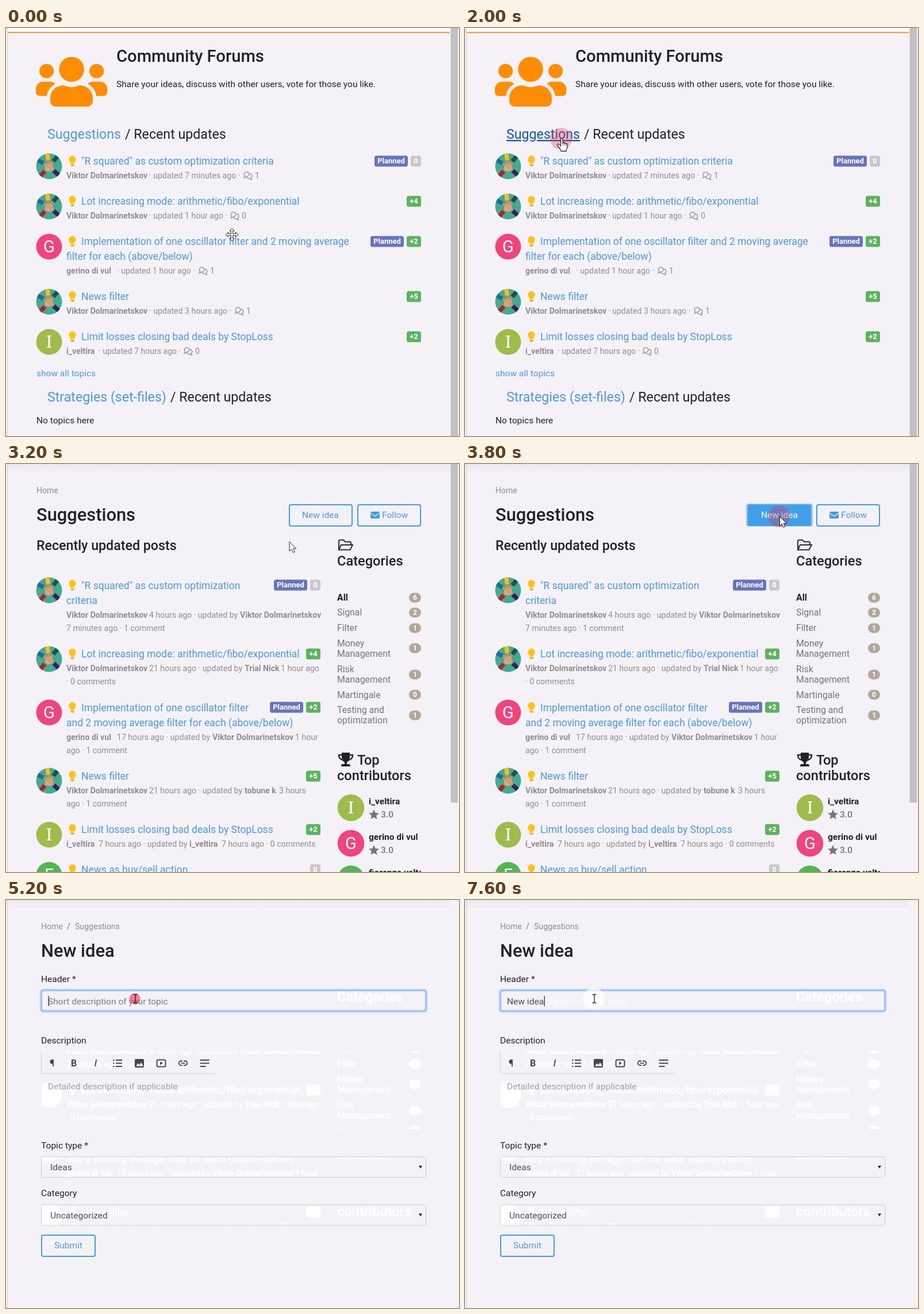
These frames come from a looping animation (788 px wide and 711 px high, 8000 ms). An HTML page:

```html
<!DOCTYPE html>
<html lang="en">
<head>
<meta charset="utf-8">
<title>Community forums</title>
<style>
  html, body { margin: 0; width: 100%; height: 100%; overflow: hidden; background: #f4f2f6; }
  svg { display: block; width: 788px; height: 711px; font-family: Roboto, sans-serif; fill: #212225; }
  text { white-space: pre; }
  .link { fill: #5096dc; }
  .hover .link, .link.hover { fill: #1455a8; text-decoration: underline; }
  .muted { fill: #8f8d93; }
  .side { fill: #77757b; }
  .field { fill: none; stroke: #cfcdd3; }
  .outline { fill: none; stroke: #429ce2; stroke-width: 2; }
  .ghost { filter: brightness(0) invert(1); }
  .ghost text { stroke: #fff; stroke-width: .4; }
</style>
</head>
<body>
<svg id="stage" viewBox="0 0 788 711"></svg>
<script>
const BODY = 15.55, TITLE = 17.48, META = 14.1, HEAD = 23.2, SIDE_HEAD = 23.6, MAIN = 30.85;
const VIKTOR = 'Viktor Dolmarinetskov', GERINO = 'gerino di vul', VELTIRA = 'i_veltira';

const text = (x, y, size, str, attrs = '') => `<text x="${x}" y="${y}" font-size="${size}" ${attrs}>${str}</text>`;
const rect = (x, y, w, h, attrs = '') => `<rect x="${x}" y="${y}" width="${w}" height="${h}" ${attrs}/>`;
const circle = (x, y, r, attrs = '') => `<circle cx="${x}" cy="${y}" r="${r}" ${attrs}/>`;
const path = (d, attrs = '') => `<path d="${d}" ${attrs}/>`;
const at = (x, y, content, attrs = '') => `<g transform="translate(${x} ${y})" ${attrs}>${content}</g>`;
const line = (d, color, width = 1) => path(d, `fill="none" stroke="${color}" stroke-width="${width}"`);
const bold = 'font-weight="700"', medium = 'font-weight="500"', mid = 'text-anchor="middle"';

const bulb = y => at(115.5, y,
  path('M-3.3 4.2C-3.3 1.5-6.2.5-6.2-3.2a6.2 6.2 0 0 1 12.4 0C6.2.5 3.3 1.5 3.3 4.2z', 'fill="#fcc21b"') +
  path('M-3.2 5.2h6.4v2L1.6 9h-3.2l-1.6-1.8z', 'fill="#eab31c"'));

const title = (y, ...lines) => bulb(y - 6) +
  lines.map((s, i) => text(i ? 105 : 131, y + i * 26, TITLE, s, 'class="link"')).join('');

const badge = (left, right, y, str, color) => rect(left, y - 9.5, right - left, 19, `rx="3.5" fill="${color}"`) +
  text((left + right) / 2, y + 4.3, 13, str, `${bold} ${mid} fill="#fff"`);
const votes = (right, y, n) => n
  ? badge(right - 25, right, y, '+' + n, '#5cb35f')
  : badge(right - 18, right, y, '0', '#cac8cc');
const planned = (left, y) => badge(left, left + 58, y, 'Planned', '#6974bc');

const arm = (angle, sleeve) => `<g transform="rotate(${angle})">` +
  line('M0-13V0', '#c1906a', 5) + line('M0-24V-11', sleeve, 7.5) + '</g>';
const hands = y => at(75, y, circle(0, 0, 22.5, 'fill="#45aa91"') + '<g clip-path="url(#disc)">' +
  arm(-8, '#f4bd22') + arm(40, '#17554a') + arm(133, '#30225f') + arm(222, '#a72631') + arm(-62, '#216e94') +
  circle(0, 2, 7, 'fill="#d9ac82"') + line('M-5-2L4 6M-2-5L6 3', '#a96f4f') + '</g>');
const letter = (x, y, ch, color, serif, r = 22.5) => circle(x, y, r, `fill="${color}"`) +
  text(x, y + 10, 29, ch, `${mid} fill="#fff" ${serif ? 'font-family="Noto Serif, serif"' : ''}`);
const avatarG = (x, y, r) => letter(x, y, 'G', '#ee457d', false, r);
const avatarI = (x, y, r) => letter(x, y, 'I', '#9fbb4c', true, r);

const bubbles = (x, y) => at(x, y,
  path('M1 2L2.6-1A4.4 4 0 1 1 5.5 0Q3.5 2 1 2zM10.5-5a4.2 3.8 0 0 1 2.4 7l1.6 3q-3 0-4.5-1.8a4.5 4 0 0 1-4.4-2',
    'fill="none" stroke="#99979c" stroke-width="1.4"'));

// A line of grey details made of [x, string, isBold] pieces.
const meta = (y, ...pieces) => pieces.map(([x, str, strong]) =>
  text(x, y, META, str, `class="muted" ${strong ? bold : ''}`)).join('');
const summary = (y, name, x, age, iconX, count) =>
  meta(y, [105, name, 1], [x, `· updated ${age} ago ·`], [iconX + 20, count]) + bubbles(iconX, y - 3);

const chrome = thumb => rect(773.5, 0, 12.5, thumb, 'fill="#c1c0c3"') + rect(2, 0, 1, 711, 'fill="#d8cbd4"');
const softTop = rect(3, 0, 769, 12, 'fill="url(#shade)"') + rect(5, 11, 767, 1, 'fill="#e9e7eb"');

const sideBody = path('M52 106a12.4 12.4 0 0 1 12.4-12.4h12.4a12.4 12.4 0 0 1 8.8 3.6 29 29 0 0 0-14.6 21.2h-12.8a6.2 6.2 0 0 1-6.2-6.2z') +
  circle(70.6, 75, 12.6);
const people = `<g fill="#ff8c05">${sideBody}<g transform="translate(228.2) scale(-1 1)">${sideBody}</g>` +
  circle(114.1, 72, 21.8) +
  path('M77 128v-6a22 22 0 0 1 22-22h2a30 30 0 0 0 26 0h2a22 22 0 0 1 22 22v6a9 9 0 0 1-9 9h-56a9 9 0 0 1-9-9z') + '</g>';

const home = chrome(711) + rect(3, 0, 769, 7, 'fill="#fbfafc"') + rect(3, 6.8, 769, 2, 'fill="#e29a3f"') + people +
  text(192, 59, 29.2, 'Community Forums', medium) +
  text(192, 103, 15.5, 'Share your ideas, discuss with other users, vote for those you like.') +
  text(72, 193, HEAD, 'Suggestions', 'id="suggestions" class="link"') + text(207, 193, HEAD, '/ Recent updates') +
  hands(241) + title(238, '"R squared" as custom optimization criteria') + planned(641, 232) + votes(722, 232, 0) +
  summary(262, VIKTOR, 249, '7 minutes', 413, 1) +
  hands(311) + title(308, 'Lot increasing mode: arithmetic/fibo/exponential') + votes(722, 302, 4) +
  summary(332, VIKTOR, 249, '1 hour', 390, 0) +
  avatarG(75, 381) + title(378, 'Implementation of one oscillator filter and 2 moving average', 'filter for each (above/below)') +
  planned(634, 372) + votes(722, 372, 2) + summary(428, GERINO, 193, '1 hour', 335, 1) +
  hands(477) + title(474, 'News filter') + votes(722, 468, 5) + summary(498, VIKTOR, 249, '3 hours', 398, 1) +
  avatarI(75, 547) + title(544, 'Limit losses closing bad deals by StopLoss') + votes(722, 538, 2) +
  summary(568, VELTIRA, 161, '7 hours', 309, 0) +
  text(53, 607, 15.5, 'show all topics', 'class="link"') +
  text(72, 651, HEAD, 'Strategies (set-files)', 'id="strategies" class="link"') + text(286, 651, HEAD, '/ Recent updates') +
  text(53, 689, BODY, 'No topics here');

const category = (lines, baseline, count, y) =>
  lines.map((s, i) => text(576, baseline + i * 18.4, 15.8, s, s === 'All' ? bold : 'class="side"')).join('') +
  rect(701, y - 8.5, 21, 17, 'rx="8.5" fill="#b3a69b"') + text(711.5, y + 4.3, 12, count, `${bold} ${mid} fill="#fff"`);

const star = (x, y) => path('M0-9L2.6-3 9-2.5 4 1.8 5.6 8 0 4.8-5.6 8-4 1.8-9-2.5-2.6-3z', `transform="translate(${x} ${y})" fill="#77757b"`);
const contributor = (y, name) => `<g clip-path="url(#column)">${text(631, y - 6, 15.5, name, bold)}</g>` +
  star(640, y + 12) + text(652, y + 17, BODY, '3.0', `${medium} class="side"`);

const folder = line('M579 149v-14.5q0-2 2-2h6l3 3h8q2 0 2 2v2.5M579 149.5l4-8.5h20l-4.5 8.5z', '#2c2b2f', 2);
const trophy = at(591, 515,
  path('M-7-12H7v7Q7 3 2 4.5V8h4q2 0 2 4H-8q0-4 2-4h4V4.5Q-7 3-7-5z') +
  line('M-7-8h-5q0 8 8 9M7-8h5q0 8-8 9', '#2c2b2f', 2.5));

const topics = hands(220) +
  `<g id="firstTopic">${title(217.5, '"R squared" as custom optimization', 'criteria')}</g>` + planned(466, 211) + votes(547, 211, 0) +
  meta(268, [105, VIKTOR, 1], [249, '4 hours ago · updated by'], [407, VIKTOR, 1]) +
  meta(291, [105, '7 minutes ago · 1 comment']) +
  hands(340) + title(337, 'Lot increasing mode: arithmetic/fibo/exponential') + votes(547, 331, 4) +
  meta(361, [105, VIKTOR, 1], [249, '21 hours ago · updated by'], [415, 'Trial Nick', 1], [478, '1 hour ago']) +
  meta(384, [105, '· 0 comments']) +
  avatarG(75, 433) + title(430.5, 'Implementation of one oscillator filter', 'and 2 moving average filter for each (above/below)') +
  planned(459, 424) + votes(547, 424, 2) +
  meta(481, [105, GERINO, 1], [193, '17 hours ago · updated by'], [359, VIKTOR, 1], [503, '1 hour']) +
  meta(504, [105, 'ago · 1 comment']) +
  hands(552) + title(550, 'News filter') + votes(547, 544, 5) +
  meta(574, [105, VIKTOR, 1], [249, '21 hours ago · updated by'], [415, 'tobune k', 1], [475, '3 hours']) +
  meta(597, [105, 'ago · 1 comment']) +
  avatarI(75, 646) + title(643, 'Limit losses closing bad deals by StopLoss') + votes(547, 637, 2) +
  meta(667, [105, VELTIRA, 1], [161, '7 hours ago · updated by'], [319, VELTIRA, 1], [375, '7 hours ago · 0 comments']) +
  letter(75, 716, 'F', '#56b455') + title(713, 'News as buy/sell action') + votes(547, 707, 0) +
  folder + text(576, 177, SIDE_HEAD, 'Categories', medium) +
  category(['All'], 238, 6, 233) + category(['Signal'], 264, 2, 259) + category(['Filter'], 291, 1, 286) +
  category(['Money', 'Management'], 318, 1, 321) + category(['Risk', 'Management'], 363, 1, 367) +
  category(['Martingale'], 408, 0, 402) + category(['Testing and', 'optimization'], 434, 1, 438) +
  trophy + text(611, 524, SIDE_HEAD, 'Top', medium) + text(576, 551, SIDE_HEAD, 'contributors', medium) +
  avatarI(600, 599, 23.3) + contributor(599, VELTIRA) + avatarG(600, 661, 23.3) + contributor(661, GERINO) +
  letter(600, 723, 'F', '#56b455', false, 23.3) + contributor(723, 'fiorenzo valtari');

const envelope = rect(634, 83, 16, 12, 'rx="1.5" fill="#429ce2"') + line('M634 85.5l8 5.5 8-5.5', '#f4f2f6', 1.3);
const list = chrome(590) + softTop +
  text(53, 51, META, 'Home', 'class="muted"') + text(53, 99, MAIN, 'Suggestions', medium) +
  text(53, 149.5, HEAD, 'Recently updated posts', medium) + topics +
  `<g id="idle">${rect(493, 71, 109, 37, 'rx="3" class="outline"')}</g>` +
  `<g id="pressed">${rect(489, 69, 116, 40, 'rx="4" fill="#a2cbee"')}${rect(491.5, 70.5, 111, 37.5, 'rx="3" fill="#429fe7"')}</g>` +
  text(547, 94, BODY, 'New idea', `id="newIdea" ${mid} class="link"`) +
  rect(612, 71, 109, 37, 'rx="3" class="outline"') + envelope + text(654, 94, BODY, 'Follow', 'class="link"');

const dark = '#47464a';
const toolbar = `<g fill="${dark}">` + text(80, 290, 17, '¶', `${bold} ${mid}`) + text(118, 290, 16, 'B', `${bold} ${mid}`) +
  text(156, 290, 16, 'I', `font-style="italic" ${medium} ${mid}`) +
  line('M191 279h11M191 284.5h11M191 290h11M186 279h2.5M186 284.5h2.5M186 290h2.5', dark, 2) +
  rect(224, 277, 16, 15, 'rx="2"') + path('M226 289.5l3.5-5 2.5 3 3-4.5 4 6.5z', 'fill="#f4f2f6"') +
  rect(262.5, 278.5, 15, 12, `rx="2.5" fill="none" stroke="${dark}" stroke-width="2"`) + path('M268 281.5l5 3-5 3z') +
  line('M307 280.5h-2.5a3.8 3.8 0 0 0 0 7.6h2.5M309 280.5h2.5a3.8 3.8 0 0 1 0 7.6h-2.5M304.5 284.3h7', dark, 1.8) +
  line('M337.5 279h16M337.5 284.5h16M337.5 290h10', dark, 2) + '</g>';
const select = (y, value) => rect(61.5, y + .5, 669, 36, 'rx="3" class="field"') +
  text(77, y + 24, BODY, value, 'fill="#4e4d52"') + path(`M718 ${y + 16}h6l-3 5z`);

const form = rect(2, 0, 1, 711, 'fill="#d8cbd4"') + softTop +
  `<g clip-path="url(#traces)"><g class="ghost">${topics.replace('id="firstTopic"', '')}</g></g>` +
  text(61, 51, META, 'Home', 'class="muted"') + text(106, 51, META, '/', 'class="side"') +
  text(120, 51, META, 'Suggestions', 'class="muted"') + text(61, 99, MAIN, 'New idea', medium) +
  text(61, 143, BODY, 'Header *') + rect(61.5, 157.5, 669, 36, 'rx="3" class="field"') +
  `<g id="focus">${rect(61, 157, 670, 37, 'rx="4" fill="none" stroke="#c3d9f6" stroke-width="5"')}` +
  rect(61.5, 157.5, 669, 36, 'rx="3" fill="none" stroke="#86b4ea" stroke-width="1.5"') + '</g>' +
  circle(224, 172, 19, 'id="clickTrace" fill="#fff" opacity=".7"') +
  text(73, 182, BODY, 'Short description of your topic', 'id="placeholder"') +
  rect(72, 165, 67, 22, 'id="typedBack" fill="#f4f2f6"') +
  text(73, 182, BODY, '', 'id="typed" fill="#4e4d52"') + rect(73, 167, 1.2, 18, 'id="caret" fill="#222"') +
  text(61, 250, BODY, 'Description') + line('M61.5 264v38.5h303', '#d2d0d6') + toolbar +
  text(73, 330, BODY, 'Detailed description if applicable', 'fill="#a19fa5"') +
  text(61, 433, BODY, 'Topic type *') + select(447, 'Ideas') + text(61, 516, BODY, 'Category') + select(530.5, 'Uncategorized') +
  rect(62, 584, 93, 37, 'rx="3" class="outline"') + text(108.5, 607, BODY, 'Submit', `${mid} class="link"`);

const arrowHead = 'M0-11l4 4.5h-2.5V-1.5h5V-4L11 0 6.5 4V1.5h-5v5H4L0 11l-4-4.5h2.5v-5h-5V4L-11 0l4.5-4v2.5h5v-5H-4z';
const cursorShapes = {
  move: path(arrowHead, 'fill="#fff" stroke="#222"'),
  hand: path('M-1.5 1.5q0-2 1.7-2t1.7 2v5.5q2-1 3 .7 2-.8 2.7.7 2.3-.6 2.3 1.7v4q0 3-2 5.5v2H-1q0-2-2-4.5l-4-5q-1.2-2.5.7-2.8 1.5 0 4.8 3.3z', 'fill="#fff" stroke="#111" stroke-width="1.1"') +
    line('M2 7v4M5 8v3.5M7.7 9v3', '#111', .8),
  arrow: path('M0 0v16.5l3.8-3.6 2.6 6 2.8-1.2-2.6-5.9h5.2z', 'fill="#fff" stroke="#222"'),
  beam: line('M-3.5-7.5q3 0 3.5 1.5 .5-1.5 3.5-1.5M0-6V6M-3.5 7.5q3 0 3.5-1.5 .5 1.5 3.5 1.5', '#222', 1.3)
};

stage.innerHTML = `<defs>
  <linearGradient id="shade" x2="0" y2="1"><stop stop-color="#eae8ed"/><stop offset="1" stop-color="#f4f2f6"/></linearGradient>
  <clipPath id="disc">${circle(0, 0, 22.5)}</clipPath>
  <clipPath id="column">${rect(570, 560, 152, 151)}</clipPath>
  <clipPath id="traces">${rect(570, 155, 130, 30)}${rect(62, 263, 669, 136)}${rect(62, 448, 669, 35)}${rect(62, 531, 669, 36)}</clipPath>
</defs>` + [home, list, form].map(p => `<g class="page">${p}</g>`).join('') +
  circle(0, 0, 10, 'id="click" fill="#e6223f"') +
  '<g id="cursor">' + Object.entries(cursorShapes).map(([k, s]) => `<g data-kind="${k}">${s}</g>`).join('') + '</g>';

const $ = id => document.getElementById(id);
const show = (el, on) => { el.style.display = on ? '' : 'none'; };
const pages = [...document.querySelectorAll('.page')];
const cursors = [...$('cursor').children];

const LOOP = 8000, TICK = 200, ENTRY = 'New idea';
const pointer = [
  [0, 393, 360, 'move'], [200, 450, 250, 'arrow'], [400, 650, 110, 'arrow'], [600, 420, 54, 'beam'],
  [800, 330, 300, 'arrow'], [1000, 180, 630, 'hand'], [1200, 168, 193, 'hand'], [2400, 168, 193, 'hand'],
  [2600, 220, 218, 'hand'], [2800, 330, 222, 'hand'], [3000, 440, 180, 'arrow'], [3400, 546, 91, 'hand'],
  [3600, 546, 91, 'arrow'], [4000, 549, 92, 'hand'], [4800, 549, 92, 'hand'], [5000, 380, 136, 'arrow'],
  [5200, 225, 172, 'beam'], [LOOP, 225, 172, 'beam']
];
const clicks = [1800, 3600, 5200];

function pointerAt(t) {
  const i = pointer.findIndex((p, n) => t < pointer[n + 1][0]);
  const [t0, x0, y0, kind] = pointer[i], [t1, x1, y1] = pointer[i + 1], k = (t - t0) / (t1 - t0);
  return { x: x0 + (x1 - x0) * k, y: y0 + (y1 - y0) * k, kind };
}

function draw(time) {
  const t = Math.floor(time % LOOP / TICK) * TICK;
  const page = t < 2200 ? 0 : t < 4000 ? 1 : 2;
  pages.forEach((p, i) => show(p, i === page));

  const { x, y, kind } = pointerAt(t);
  $('cursor').setAttribute('transform', `translate(${x} ${y})`);
  cursors.forEach(c => show(c, c.dataset.kind === kind));

  const start = clicks.find(c => t >= c && t < c + 400);
  show($('click'), start !== undefined);
  if (start !== undefined) {
    const k = (t - start) / TICK;
    $('click').setAttribute('cx', x - 1);
    $('click').setAttribute('cy', y);
    $('click').setAttribute('r', 9.5 + 9.5 * k);
    $('click').setAttribute('opacity', .55 - .25 * k);
  }

  $('suggestions').classList.toggle('hover', t >= 1200);
  $('strategies').classList.toggle('hover', t === 1000);
  $('firstTopic').classList.toggle('hover', t >= 2600 && t < 3000);
  const pressed = t >= 3400;
  show($('idle'), !pressed);
  show($('pressed'), pressed);
  $('newIdea').style.fill = pressed ? '#fff' : '';

  const count = t < 7000 ? 0 : Math.min(ENTRY.length, 1 + Math.round((t - 7000) / 600 * 7));
  $('typed').textContent = ENTRY.slice(0, count);
  $('placeholder').style.fill = count ? '#fff' : '#7d7b81';
  show($('typedBack'), count);
  show($('focus'), t >= 5200);
  show($('clickTrace'), t >= 5600);
  show($('caret'), t >= 5200 && (t < 5600 || t >= 6000));
  if (page === 2) $('caret').setAttribute('x', 73.5 + $('typed').getComputedTextLength());
}

const origin = performance.now();
(function frame() {
  draw(performance.now() - origin);
  requestAnimationFrame(frame);
})();
</script>
</body>
</html>
```
